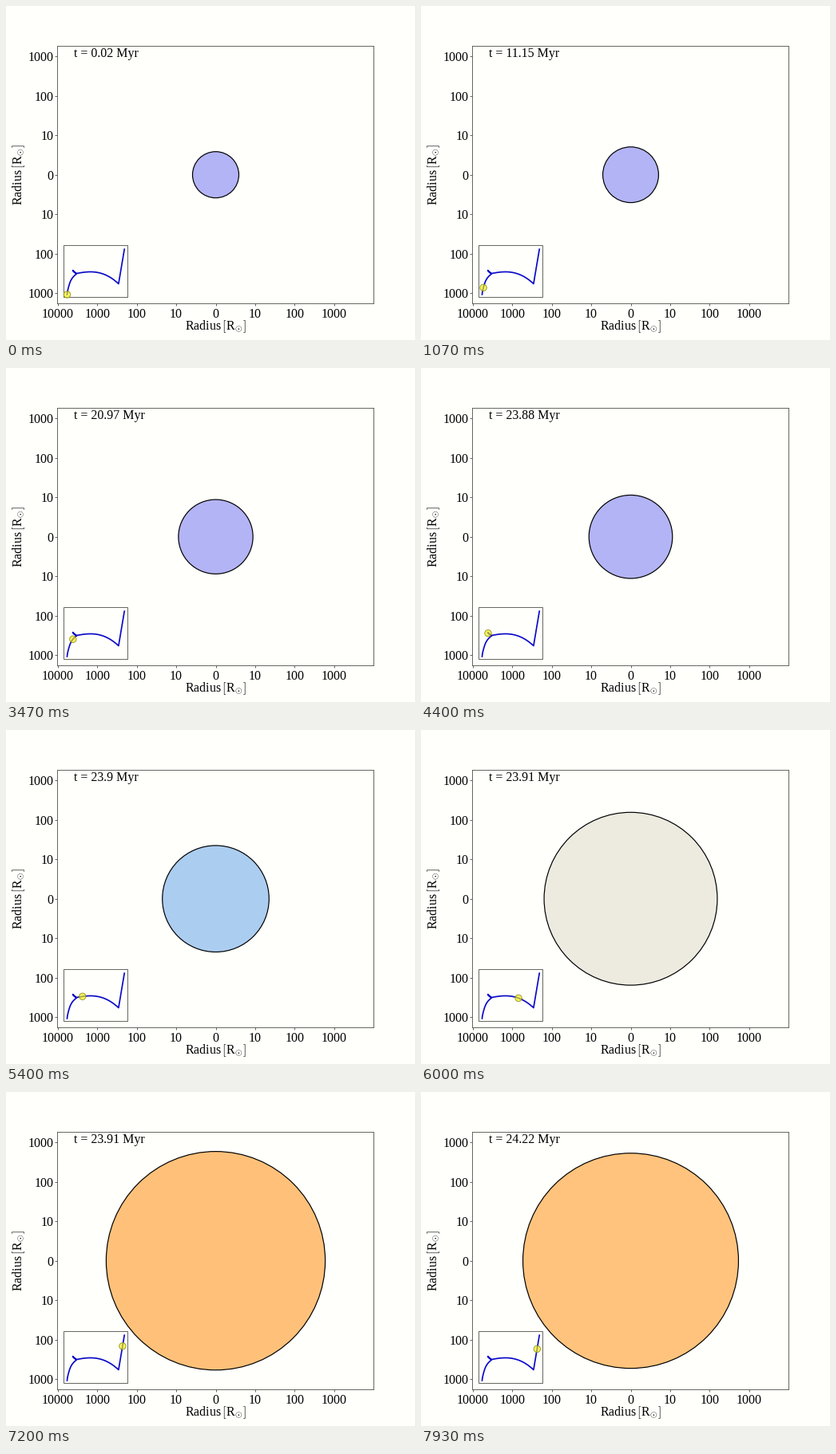
These frames come from a looping animation (512x419 px, 8000 ms). A matplotlib script:

```python
import math
import numpy as np
import matplotlib.pyplot as plt
from matplotlib.animation import FuncAnimation
from matplotlib.patches import Circle, Rectangle

W, H, DPI = 512, 419, 64
PX = 72 / DPI                      # points per pixel
FRAMES, INTERVAL = 200, 40
STEPS = 120                        # model steps in one loop
CX, CY, DECADE = 262.5, 211.7, 49.45
L, R, T, B = 64.2, 460.2, 50.2, 373.2
PAPER, LINE = "#fffffc", "#585850"

# last step of each phase of the star's life
MAIN, HOOK, LOOP, CROSS, TIP = 61, 65, 78, 96, 108

plt.rcParams.update({
    "font.family": "Liberation Serif",
    "font.size": 16 * PX,
    "mathtext.fontset": "cm",
})


def part(s, start, end):
    return min(max((s - start) / (end - start), 0), 1)


def giant(g):
    """Position and radius at height g on the giant branch."""
    return 140.9 + 5 * g, 348.5 - 29.7 * g, 119.1 + 18 * g


def star(s):
    """Track position and drawn radius at step s, in pixels."""
    if s <= MAIN:
        u = s / MAIN
        return (76.5 + 6 * u + 5.8 * u ** 6,
                362 - 22 * u ** 0.7 - 4 * u ** 4,
                29 + 15 * u ** 0.7 + 8 * u ** 4)
    if s <= HOOK:
        u = part(s, MAIN, HOOK)
        return 88.3 - 4.7 * u, 336 - 4.4 * u, 52
    if s <= LOOP:
        u = part(s, HOOK, LOOP)
        return 83.6 + 4.9 * u, 331.6 + 3.9 * math.sqrt(u), 52 + 3.5 * u
    if s <= CROSS:
        u = part(s, LOOP, CROSS)
        w = u ** 1.1
        return (88.5 + 52.4 * w, 335.5 - 10 * w + 23 * w ** 2.6,
                55.5 + 63.6 * math.sin(math.pi / 2 * u) ** 1.28)
    u = part(s, CROSS, TIP)
    return giant(u * u * (3 - 2 * u) - 0.12 * part(s, TIP, STEPS - 1) ** 2)


def age(s):
    """Slowing steps while hydrogen burns, then a late helium phase."""
    if s <= HOOK:
        return 0.02 + 2.51516 * s ** 0.536432
    return (23.91 - 0.03 * math.exp((HOOK + 1 - s) / 12)
            + 0.31 * math.exp((s - STEPS + 1) / 2.5))


def tint(x):
    """Fill colour from temperature, the x axis of the track."""
    shades = np.array([(178, 180, 245), (171, 205, 240),
                       (245, 238, 222), (255, 193, 122)]) / 255
    return [np.interp(x, (84, 96, 125, 146), c) for c in shades.T]


def decade_label(k):
    return str(10 ** abs(k)) if k else "0"


fig = plt.figure(figsize=(W / DPI, H / DPI), dpi=DPI, facecolor=PAPER)
ax = fig.add_axes([L / W, 1 - B / H, (R - L) / W, (B - T) / H], facecolor=PAPER)
for spine in ax.spines.values():
    spine.set(linewidth=0.9 * PX, edgecolor=LINE)

across, down = range(-4, 5), range(-3, 4)
ax.set_xticks([CX + DECADE * k for k in across], map(decade_label, across))
ax.set_yticks([CY + DECADE * k for k in down], map(decade_label, down))
ax.tick_params(length=3 * PX, width=0.9 * PX, color=LINE)
ax.tick_params(axis="x", pad=2.5 * PX)
ax.tick_params(axis="y", pad=1.5 * PX)
ax.set(xlim=(L, R), ylim=(B, T))

label = r"Radius$\,[$R$_{\odot}]$"
fig.text(262 / W, 1 - 406 / H, label, ha="center", va="baseline")
fig.text(20.5 / W, 1 - 212 / H, label, rotation=90, rotation_mode="anchor",
         ha="center", va="baseline")

disc = Circle((CX, CY), 1, ec="black", lw=1.2 * PX)
ax.add_patch(disc)
ax.add_patch(Rectangle((72.2, 300.2), 79.5, 64.5, fc=PAPER, ec=LINE,
                       lw=0.9 * PX, zorder=3))
track = [star(s) for s in np.arange(0, CROSS + 0.1, 0.25)] + [giant(1.46)]
track_x, track_y, _ = zip(*track)
ax.plot(track_x, track_y, color="#0808c8", lw=1.7 * PX, zorder=4)
marker = Circle((0, 0), 4.2, fc=(0.96, 0.94, 0.05, 0.65), ec="#8c8c10",
                lw=0.8 * PX, zorder=5, clip_on=False)
ax.add_patch(marker)
clock = ax.text(85, 63.6, "", va="baseline", zorder=6)


def draw(n):
    s = min(round(n * STEPS / FRAMES), STEPS - 1)
    x, y, radius = star(s)
    disc.set_radius(radius)
    disc.set_facecolor(tint(x))
    marker.center = x, y
    clock.set_text(f"t = {round(age(s), 2)} Myr")
    return disc, marker, clock


anim = FuncAnimation(fig, draw, frames=FRAMES, interval=INTERVAL,
                     repeat=True, repeat_delay=0)
plt.show()
```
